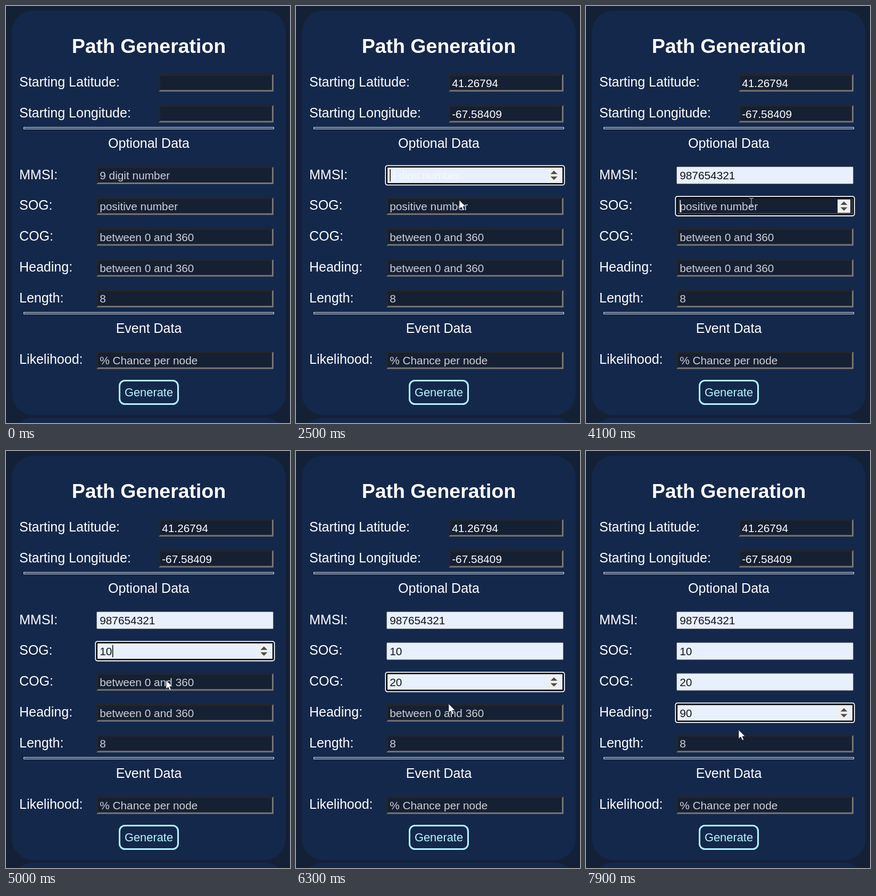
Write an HTML page that moves like this. It is 534 by 782 pixels and loops after 8 s.

```html
<!DOCTYPE html>
<html lang="en">
<head>
<meta charset="utf-8">
<title>Path Generation</title>
<style>
  html, body { margin: 0; width: 100%; height: 100%; overflow: hidden; background: #142036; }
  svg { display: block; font-family: "Liberation Sans", Arial, sans-serif; }
  text { fill: #fff; font-size: 25px; white-space: pre; }
  .title { font-size: 37.5px; font-weight: bold; }
  .mid { text-anchor: middle; }
  .button { font-size: 21.875px; fill: #b2f8ff; }
  .field text { font-size: 20.83px; }
  .card { fill: #14284b; }
  .rule { fill: none; stroke: #f0f2f5; }
</style>
</head>
<body>
<svg id="stage" width="534" height="782" viewBox="0 0 534 782">
  <rect class="card" x="11" y="9" width="515" height="758" rx="40"/>
  <rect class="card" x="11" y="772" width="515" height="200" rx="40"/>
  <text class="title mid" x="268.5" y="88">Path Generation</text>
  <text class="mid" x="268.5" y="266">Optional Data</text>
  <text class="mid" x="268.5" y="613">Event Data</text>
  <rect class="rule" x="33.5" y="227.5" width="470" height="3"/>
  <rect class="rule" x="33.5" y="574.5" width="470" height="3"/>
  <rect x="213.5" y="702.5" width="110" height="44" rx="10" fill="none" stroke="#b2f8ff" stroke-width="3"/>
  <text class="button mid" x="268.5" y="732">Generate</text>
  <g id="fields"></g>
  <g id="pointer">
    <path id="arrow" d="M0 0V16.5L4 13L7 19.5L9.6 18.3L6.8 12H12Z" fill="#fff" stroke="#1b2437" stroke-width=".7"/>
    <path id="beam" d="M-4 -7.5H-1.5L0 -6.5L1.5 -7.5H4M0 -6.5V6.5M-4 7.5H-1.5L0 6.5L1.5 7.5H4" fill="none" stroke="#b4bac4" stroke-width="1.2"/>
  </g>
</svg>
<script>
const LOOP = 8000, STEP = 100, ROW = 57.8, RIGHT = 503, HEIGHT = 33;
const $ = id => document.getElementById(id);

function add(parent, tag, attrs, text) {
  const node = document.createElementNS('http://www.w3.org/2000/svg', tag);
  for (const key in attrs) node.setAttribute(key, attrs[key]);
  if (text) node.textContent = text;
  return parent.appendChild(node);
}
const show = (node, on) => node.setAttribute('visibility', on ? 'visible' : 'hidden');

// Times in ms: focus and blur, suggestion preview, suggestion accepted.
const specs = [
  { label: 'Starting Latitude:', row: 0, x: 287, hint: '', value: '41.26794', typed: 100 },
  { label: 'Starting Longitude:', row: 1, x: 287, hint: '', value: '-67.58409', typed: 100 },
  { label: 'MMSI:', row: 3, hint: '9 digit number', value: '987654321',
    hover: 1300, focus: 1500, preview: 2500, fill: 2700, blur: 3700, ghost: true },
  { label: 'SOG:', row: 4, hint: 'positive number', value: '10',
    focus: 3700, preview: 4700, fill: 4900, blur: 5400 },
  { label: 'COG:', row: 5, hint: 'between 0 and 360', value: '20',
    focus: 5400, preview: 6200, fill: 6500, blur: 7100 },
  { label: 'Heading:', row: 6, hint: 'between 0 and 360', value: '90',
    focus: 7100, preview: 7600, fill: LOOP, blur: LOOP },
  { label: 'Length:', row: 7, hint: '8' },
  { label: 'Likelihood:', row: 9, hint: '% Chance per node' }
];

function buildField(spec) {
  const x = spec.x || 170, y = 127.6 + spec.row * ROW, w = RIGHT - x;
  add($('fields'), 'text', { x: 25, y: y + 23.6 }, spec.label);
  const g = add($('fields'), 'g', { class: 'field', transform: `translate(${x} ${y})` });
  const f = { ...spec };

  f.dark = add(g, 'g', {});
  add(f.dark, 'rect', { width: w, height: HEIGHT, fill: '#162033' });
  add(f.dark, 'path', { d: `M0 ${HEIGHT}V0H${w}L${w - 3} 3H3V${HEIGHT - 3}Z`, fill: '#25262b' });
  add(f.dark, 'path', { d: `M0 ${HEIGHT}H${w}V0L${w - 3} 3V${HEIGHT - 3}H3Z`, fill: '#767676' });

  f.light = add(g, 'rect', { x: .5, y: .5, width: w - 1, height: HEIGHT - 1, rx: 1.5,
    fill: '#e8f0fe', stroke: '#767676' });

  f.spin = add(g, 'g', {});
  add(f.spin, 'rect', { x: w - 30, y: 4, width: 24, height: 25, fill: '#efefef' });
  add(f.spin, 'path', { d: `M${w - 24.5} 14.2h13l-6.5 -6.4zM${w - 24.5} 18.8h13l-6.5 6.4z`, fill: '#4c4c4c' });

  f.ring = add(g, 'g', { fill: 'none' });
  add(f.ring, 'rect', { x: .5, y: .5, width: w - 1, height: HEIGHT - 1, rx: 1.5,
    stroke: '#080a10', 'stroke-width': 3 });
  add(f.ring, 'rect', { x: -1.7, y: -1.7, width: w + 3.4, height: HEIGHT + 3.4, rx: 3.5,
    stroke: '#fff', 'stroke-width': 1.8 });

  f.text = add(g, 'text', { x: 6.2, y: 24.2 }, ' ');
  f.caret = add(g, 'rect', { y: 5, width: 1.5, height: 23 });
  return f;
}

function drawField(f, t) {
  const after = time => t >= time;
  const focused = after(f.focus) && t < f.blur;
  const lit = after(f.preview);
  const ghost = f.ghost && lit && t < f.preview + STEP;
  const filled = (lit && !ghost) || after(f.typed);

  show(f.dark, !lit);
  show(f.light, lit);
  show(f.ring, focused);
  show(f.spin, focused || (after(f.hover) && t < f.blur));

  f.text.textContent = filled ? f.value : f.hint || '';
  f.text.style.fill = ghost ? 'rgba(255,255,255,.65)' : lit ? '#10131a' : filled ? '#fff' : '#ccd0d6';

  const since = t - (after(f.fill) ? f.fill : f.focus);
  show(f.caret, focused && since % 1000 < 500);
  f.caret.setAttribute('x', after(f.fill) ? 6.8 + f.value.length * 11.58 : 6.4);
  f.caret.setAttribute('fill', lit ? '#000' : '#fff');
}

// Pointer stops: time, x, y
const path = [
  [1000, 352, 205], [1400, 338, 304], [1600, 334, 314], [2300, 307, 364], [2900, 307, 364],
  [3400, 311, 368], [4200, 311, 368], [4700, 301, 429], [5400, 301, 431],
  [6100, 287, 474], [6700, 287, 475], [7000, 287, 484], [7500, 287, 484], [7700, 287, 523], [LOOP, 287, 523]
];
const arrowTimes = [[1900, 3000], [4400, 5200], [5800, 6700], [7600, LOOP]];

function drawPointer(t) {
  const visible = t >= path[0][0];
  const arrow = arrowTimes.some(([from, to]) => t >= from && t < to);
  show($('arrow'), visible && arrow);
  show($('beam'), visible && !arrow);
  if (!visible) return;
  const next = path.findIndex(stop => stop[0] > t);
  const [t0, x0, y0] = path[next - 1], [t1, x1, y1] = path[next];
  const k = (t - t0) / (t1 - t0), e = k * k * (3 - 2 * k);
  $('pointer').setAttribute('transform', `translate(${x0 + (x1 - x0) * e} ${y0 + (y1 - y0) * e})`);
}

const fields = specs.map(buildField);
const start = performance.now();

function render() {
  const t = Math.floor((performance.now() - start) % LOOP / STEP) * STEP;
  fields.forEach(f => drawField(f, t));
  drawPointer(t);
  requestAnimationFrame(render);
}
render();
</script>
</body>
</html>
```
